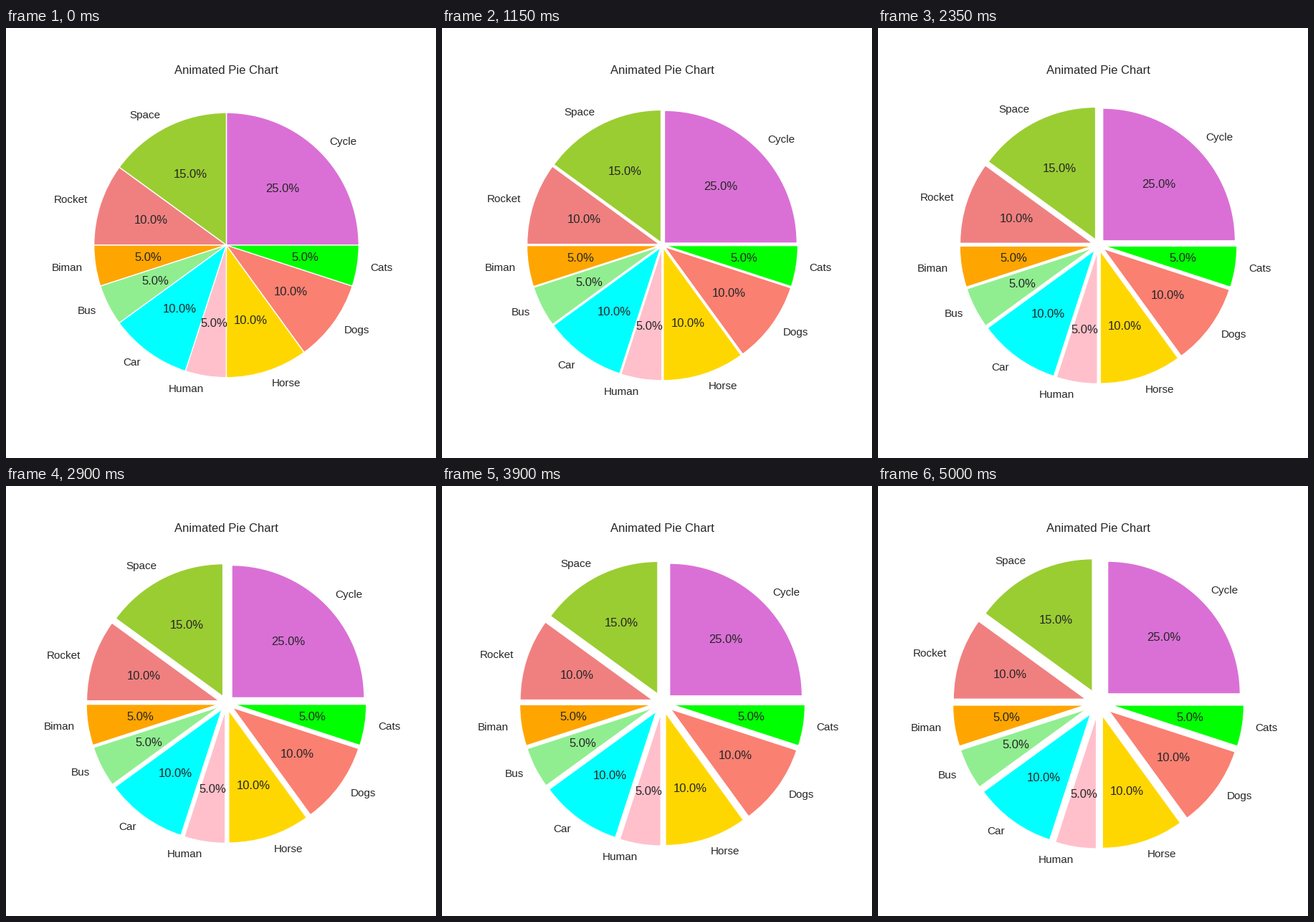
Write a matplotlib script that moves like this. It is 600 by 600 pixels and loops after 5050 ms.

```python
import matplotlib.pyplot as plt
from matplotlib.animation import FuncAnimation

plt.rcParams.update({
    "font.family": "Liberation Sans",
    "font.size": 12,
    "axes.titlesize": 12,
    "xtick.labelsize": 11,
    "text.color": "0.15",
    "patch.edgecolor": "white",
    "patch.linewidth": 1,
    "patch.force_edgecolor": True,
})

FRAMES = 101
STEP = 0.001  # outward shift per frame, in radii

SLICES = [
    ("Cycle", 25, "orchid"),
    ("Space", 15, "yellowgreen"),
    ("Rocket", 10, "lightcoral"),
    ("Biman", 5, "orange"),
    ("Bus", 5, "lightgreen"),
    ("Car", 10, "cyan"),
    ("Human", 5, "pink"),
    ("Horse", 10, "gold"),
    ("Dogs", 10, "salmon"),
    ("Cats", 5, "lime"),
]
labels, sizes, colors = zip(*SLICES)

fig, ax = plt.subplots(figsize=(6, 6), dpi=100, facecolor="white")
fig.subplots_adjust(left=0.125, right=0.9, bottom=0.11, top=0.88)


def draw(i):
    ax.clear()
    ax.pie(sizes, labels=labels, colors=colors, autopct="%1.1f%%",
           explode=[STEP * i] * len(sizes))
    ax.set_title("Animated Pie Chart")


anim = FuncAnimation(fig, draw, frames=FRAMES, init_func=lambda: draw(0),
                     interval=50, repeat=True, repeat_delay=0)
plt.show()
```
